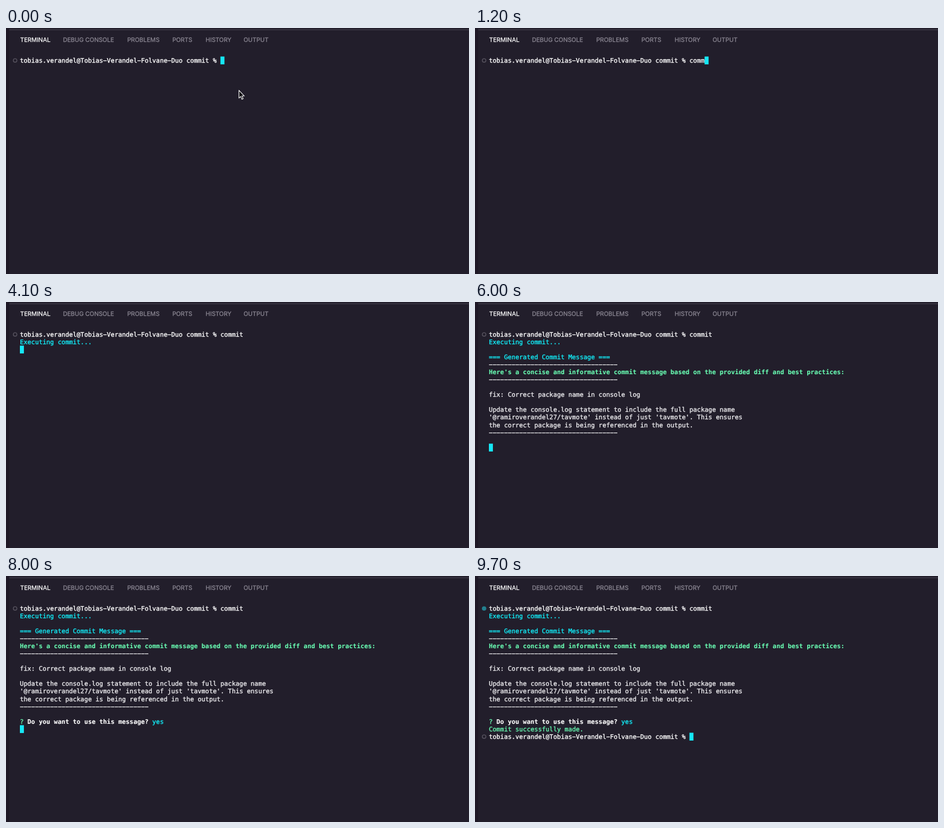
An HTML page with a canvas that plays this animation: 800 by 426 pixels, repeating every 9.8 s.

```html
<!DOCTYPE html>
<html lang="en">
<head>
<meta charset="utf-8">
<title>Terminal session</title>
<style>
  html, body { margin: 0; width: 100%; height: 100%; overflow: hidden; background: #221e2b; }
  canvas { display: block; }
</style>
</head>
<body>
<canvas id="stage" width="800" height="426"></canvas>
<script>
const ctx = document.getElementById('stage').getContext('2d');
const LOOP = 9800;
const CELL = 6.538, ROW = 13.06, LEFT = 24, TOP = 49.4;
const MONO = '10.86px "DejaVu Sans Mono", monospace';
const COLOR = {
  bg: '#221e2b', edge: '#1e1826', line: '#4b4753', tab: '#8d8995',
  white: '#ffffff', text: '#eeedf0', cyan: '#12eef9', cursor: '#16e7f5',
  green: '#68f9b1', grey: '#85818c', ring: '#57535f', done: '#23808f'
};
const PROMPT = 'tobias.verandel@Tobias-Verandel-Folvane-Duo commit % ';
const QUESTION = 'Do you want to use this message?';
const RULE = '-'.repeat(34);
const TABS = [['TERMINAL', 24.5], ['DEBUG CONSOLE', 98.5], ['PROBLEMS', 209.5],
              ['PORTS', 287.5], ['HISTORY', 345], ['OUTPUT', 410.5]];
const MESSAGE = [
  [3, '=== Generated Commit Message ===', COLOR.cyan],
  [4, RULE],
  [5, "Here's a concise and informative commit message based on the provided diff and best practices:", COLOR.green, true],
  [6, RULE],
  [8, 'fix: Correct package name in console log'],
  [10, 'Update the console.log statement to include the full package name'],
  [11, "'@ramiroverandel27/tavmote' instead of just 'tavmote'. This ensures"],
  [12, 'the correct package is being referenced in the output.'],
  [13, RULE]
];
const KEY_TIMES = [900, 1000, 1100, 1200, 1300, 1500];
const AT = { hidePointer: 800, enter: 2800, running: 3600, message: 6000,
             question: 6100, answer: 7500, confirm: 7900, success: 8300, finish: 8600 };

// A hairline stroke gives the glyphs the fuller weight of smoothed text.
function glyphs(text, x, y, color, weight) {
  ctx.fillStyle = ctx.strokeStyle = color;
  ctx.lineWidth = weight;
  ctx.fillText(text, x, y);
  ctx.strokeText(text, x, y);
}

// Text sits on the terminal's character grid; hyphens get a wide glyph.
function print(row, text, color = COLOR.text, bold = false, col = 0) {
  ctx.font = (bold ? 'bold ' : '') + MONO;
  const y = TOP + row * ROW + 10.4;
  [...text].forEach((ch, i) => {
    if (ch !== ' ') glyphs(ch === '-' ? '\u2212' : ch, LEFT + (col + i) * CELL, y, color, bold ? 0.1 : 0.35);
  });
}

function drawCursor(row, col) {
  ctx.fillStyle = COLOR.cursor;
  ctx.fillRect(LEFT + col * CELL, TOP + row * ROW, CELL + 0.4, ROW + 0.5);
}

function drawMark(row, done) {
  ctx.beginPath();
  ctx.arc(15.7, 56.2 + row * ROW, done ? 3.8 : 3.1, 0, Math.PI * 2);
  if (done) {
    ctx.fillStyle = COLOR.done;
    ctx.fill();
  } else {
    ctx.strokeStyle = COLOR.ring;
    ctx.lineWidth = 1.4;
    ctx.stroke();
  }
}

function drawPointer() {
  const path = new Path2D('M402.5 107.8V121.4L405.5 118.6L407.6 123.5L409.8 122.5L407.7 117.8H411.8Z');
  ctx.fillStyle = '#111015';
  ctx.fill(path);
  ctx.strokeStyle = '#f2f2f2';
  ctx.lineWidth = 1.1;
  ctx.stroke(path);
}

function drawPanel() {
  ctx.fillStyle = COLOR.bg;
  ctx.fillRect(0, 0, 800, 426);
  ctx.fillStyle = COLOR.edge;
  ctx.fillRect(0, 0, 5.5, 426);
  ctx.fillStyle = COLOR.line;
  ctx.fillRect(5.5, 2.6, 794.5, 1);
  ctx.font = '10.3px Inter, sans-serif';
  TABS.forEach(([label, x], i) => glyphs(label, x, 24, i ? COLOR.tab : COLOR.white, 0.25));
}

function cursorCell(t, typed) {
  if (t < AT.enter) return [0, PROMPT.length + typed];
  if (t < AT.running) return [1, 0];
  if (t < AT.message) return [2, 0];
  if (t < AT.question) return [15, 0];
  if (t < AT.answer) return [15, 41];
  if (t < AT.confirm) return [15, 42];
  if (t < AT.success) return [16, 0];
  return [17, t < AT.finish ? 0 : PROMPT.length];
}

function draw(t) {
  const typed = KEY_TIMES.filter(time => t >= time).length;
  drawPanel();
  drawMark(0, t >= AT.finish);
  print(0, PROMPT + 'commit'.slice(0, typed), COLOR.white);
  if (t >= AT.running) print(1, 'Executing commit...', COLOR.cyan);
  if (t >= AT.message) MESSAGE.forEach(line => print(...line));
  if (t >= AT.question) {
    print(15, '?', COLOR.green);
    print(15, QUESTION, COLOR.white, true, 2);
    if (t < AT.confirm) print(15, '(Y/n)', COLOR.grey, false, 35);
    else print(15, 'yes', COLOR.cyan, false, 35);
  }
  if (t >= AT.answer && t < AT.confirm) print(15, 'y', COLOR.text, false, 41);
  if (t >= AT.success) print(16, 'Commit successfully made.', COLOR.green);
  if (t >= AT.finish) {
    drawMark(17, false);
    print(17, PROMPT, COLOR.white);
  }
  drawCursor(...cursorCell(t, typed));
  if (t < AT.hidePointer) drawPointer();
}

ctx.textRendering = 'geometricPrecision';
ctx.lineJoin = 'round';
const start = performance.now();
function tick() {
  draw((performance.now() - start) % LOOP);
  requestAnimationFrame(tick);
}
tick();
</script>
</body>
</html>
```
